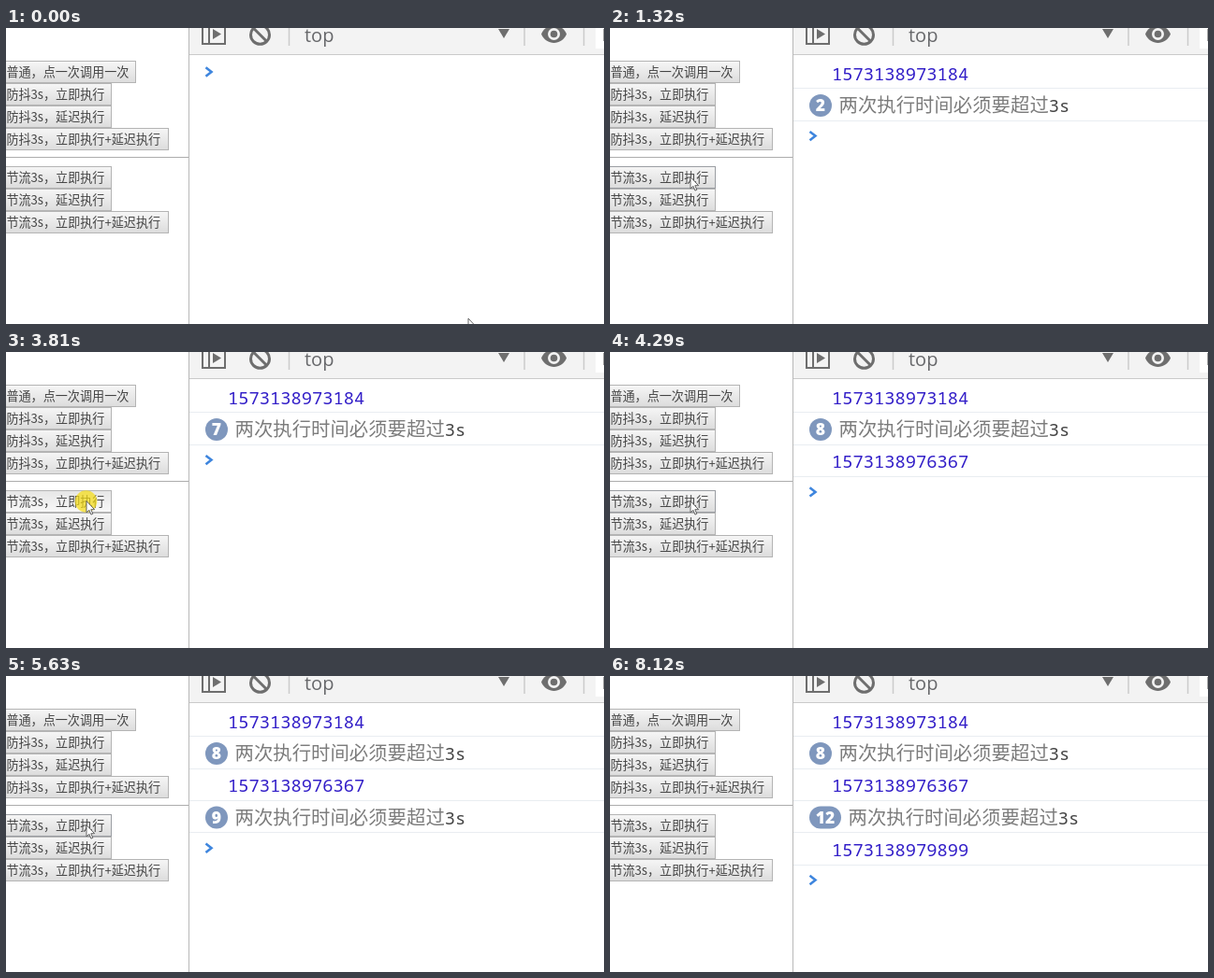
An HTML page that plays this animation: 639 by 317 pixels, repeating every 9150 ms.

```html
<!DOCTYPE html>
<html lang="zh-CN">
<head>
<meta charset="utf-8">
<title>防抖与节流</title>
<style>
html, body { margin: 0; width: 100%; height: 100%; overflow: hidden; background: #fff; }
svg { display: block; width: 639px; height: 317px; }
.label { font: 13.1px "Noto Sans CJK SC", "Noto Sans CJK", sans-serif; font-weight: 300; fill: #444; }
.num { font: 18.75px "Noto Sans Mono", monospace; fill: #321ec8; }
.msg { font: 20.4px "Noto Sans CJK SC", "Noto Sans CJK", sans-serif; font-weight: 300; fill: #7c7c7c; }
.msg .unit { font: 18.75px "Noto Sans Mono", monospace; fill: #444; }
.count { font: 800 17.5px "Open Sans", sans-serif; fill: #fff; text-anchor: middle; }
.top { font: 20px "Open Sans", sans-serif; fill: #66676a; }
.icon { fill: none; stroke: #6e6e6e; }
.solid { fill: #6e6e6e; }
</style>
</head>
<body>
<svg id="stage" viewBox="0 0 639 317">
  <defs>
    <linearGradient id="face" x1="0" y1="0" x2="0" y2="1">
      <stop offset="0" stop-color="#f6f6f6"/>
      <stop offset="1" stop-color="#dcdcdc"/>
    </linearGradient>
    <linearGradient id="pressed" x1="0" y1="0" x2="0" y2="1">
      <stop offset="0" stop-color="#e6e6e6"/>
      <stop offset="1" stop-color="#f8f8f8"/>
    </linearGradient>
    <clipPath id="view"><rect width="639" height="317"/></clipPath>
  </defs>
  <rect width="639" height="317" fill="#fff"/>
  <g id="buttons"></g>
  <path d="M0 138.5H195" stroke="#adadad"/>
  <path d="M195.5 0V317" stroke="#b8b8b8"/>

  <g id="toolbar">
    <rect x="196" width="443" height="28" fill="#f3f3f3"/>
    <path d="M196 28.5H639" stroke="#cacaca"/>
    <path class="icon" stroke-width="2" d="M210 -4V17H234V-4M217 -4V17"/>
    <path class="solid" d="M221 1L230 6.5L221 12Z"/>
    <circle class="icon" stroke-width="3" cx="271.5" cy="7.3" r="10"/>
    <path class="icon" stroke-width="3" d="M264.5 .3L278.5 14.3"/>
    <path d="M302.5 0V19M554 0V19M617.5 0V19" stroke="#cbcbcb" stroke-width="1.5"/>
    <text class="top" x="319" y="14.7">top</text>
    <path class="solid" d="M526 1H538L532 11Z"/>
    <path class="solid" d="M572 6.5C577 -6 594 -6 599 6.5C594 19 577 19 572 6.5Z"/>
    <circle cx="585.5" cy="6.5" r="6.5" fill="#f3f3f3"/>
    <circle class="solid" cx="585.5" cy="6.5" r="3.8"/>
    <rect x="630" width="9" height="22" fill="#fff"/>
    <path d="M638.5 1V14" stroke="#aaa"/>
  </g>

  <g id="log"></g>
  <path id="prompt" d="M213.5 -4.7L219.5 0L213.5 4.7" fill="none" stroke="#3f86de" stroke-width="2.6"/>
  <circle id="glow" cx="85.5" cy="160" r="11.8" fill="#f5dc10" opacity=".7"/>
  <g clip-path="url(#view)">
    <path id="cursor" d="M0 0V12.4L2.9 9.8L4.9 14.6L6.8 13.8L4.8 9.2H8.6Z" fill="#fff" stroke="#555" stroke-width=".9"/>
  </g>
</svg>
<script>
const LOOP = 9150, ROW = 34.3;
const $ = id => document.getElementById(id);

function add(parent, tag, attrs, text) {
  const el = document.createElementNS("http://www.w3.org/2000/svg", tag);
  for (const key in attrs) el.setAttribute(key, attrs[key]);
  if (text) el.textContent = text;
  parent.appendChild(el);
  return el;
}
const show = (el, on) => el.setAttribute("visibility", on ? "visible" : "hidden");
const place = (el, x, y) => el.setAttribute("transform", `translate(${x} ${y})`);

function addButton(label, y, width) {
  const box = add($("buttons"), "rect", {
    x: -4.5, y: y + .5, width: width + 4, height: 23, fill: "url(#face)", stroke: "#b4b4b4"
  });
  add($("buttons"), "text", { class: "label", x: .4, y: y + 16.6 }, label);
  return box;
}

addButton("普通，点一次调用一次", 35, 139);
const modes = [["立即执行", 113], ["延迟执行", 113], ["立即执行+延迟执行", 174]];
const group = (name, top) =>
  modes.map(([mode, width], i) => addButton(`${name}3s，${mode}`, top + 24 * i, width));
group("防抖", 59);
const [target] = group("节流", 148);

// Each entry lists the moments at which it is logged; repeats raise its badge.
const entries = [
  { value: "1573138973184", at: [920] },
  { at: [1250, 1320, 1480, 1640, 1790, 1870, 2100, 3900] },
  { value: "1573138976367", at: [4150] },
  { at: [4370, 4610, 4850, 5000, 5150, 5310, 5390, 5550, 5630, 5940, 6100, 6260] },
  { value: "1573138979899", at: [7650] }
];
const presses = [
  [840, 1000], [1170, 1250], [1400, 1480], [1560, 1640], [1720, 1790], [1950, 2100],
  [3810, 3900], [4070, 4150], [4220, 4290], [4520, 4610], [4770, 4850], [4920, 5000],
  [5060, 5150], [5230, 5310], [5470, 5550], [6020, 6100], [6180, 6260], [7590, 7650]
];

entries.forEach((entry, i) => {
  const row = entry.row = add($("log"), "g", {});
  const y = 48.8 + ROW * i;
  place(row, 0, y);
  const lineY = Math.floor(64.9 + ROW * i) + .5 - y;
  add(row, "path", { d: `M196 ${lineY}H639`, stroke: "#e9edf1" });
  if (entry.value) {
    add(row, "text", { class: "num", x: 237, y: 6.8 }, entry.value);
    return;
  }
  entry.badge = add(row, "g", {});
  entry.pill = add(entry.badge, "rect", { x: 213, y: -12.2, height: 24, rx: 12, fill: "#7f97bd" });
  entry.count = add(entry.badge, "text", { class: "count", y: 6.3 });
  entry.msg = add(row, "text", { class: "msg", y: 6.9 }, "两次执行时间必须要超过");
  add(entry.msg, "tspan", { class: "unit" }, "3s");
});

function drawEntry(entry, t) {
  const n = entry.at.filter(time => time <= t).length;
  entry.row.setAttribute("display", n ? "inline" : "none");
  if (entry.value || !n) return n > 0;
  const width = n > 9 ? 34 : 24;
  show(entry.badge, n > 1);
  entry.pill.setAttribute("width", width);
  entry.count.setAttribute("x", 213 + width / 2);
  entry.count.textContent = n;
  entry.msg.setAttribute("x", n > 1 ? 220.5 + width : 237);
  return true;
}

function drawCursor(t) {
  show($("cursor"), t < 8120);
  if (t >= 8060) return place($("cursor"), 245, 186);
  const step = t < 70 ? 0 : Math.min(8, Math.floor((t - 70) / 78.5) + 1);
  const k = step / 8, ease = k * k * (3 - 2 * k);
  place($("cursor"), 494 - 408 * ease, 311 - 151.5 * ease);
}

function draw(t) {
  const rows = entries.filter(entry => drawEntry(entry, t)).length;
  const down = presses.some(([from, to]) => t >= from && t < to);
  place($("prompt"), 0, 47 + ROW * rows);
  show($("glow"), down);
  target.setAttribute("fill", down ? "url(#pressed)" : "url(#face)");
  target.setAttribute("stroke", !down && t >= 620 && t < 8060 ? "#9b9ea3" : "#b4b4b4");
  drawCursor(t);
}

const start = performance.now();
function tick() {
  draw((performance.now() - start) % LOOP);
  requestAnimationFrame(tick);
}
tick();
</script>
</body>
</html>
```
